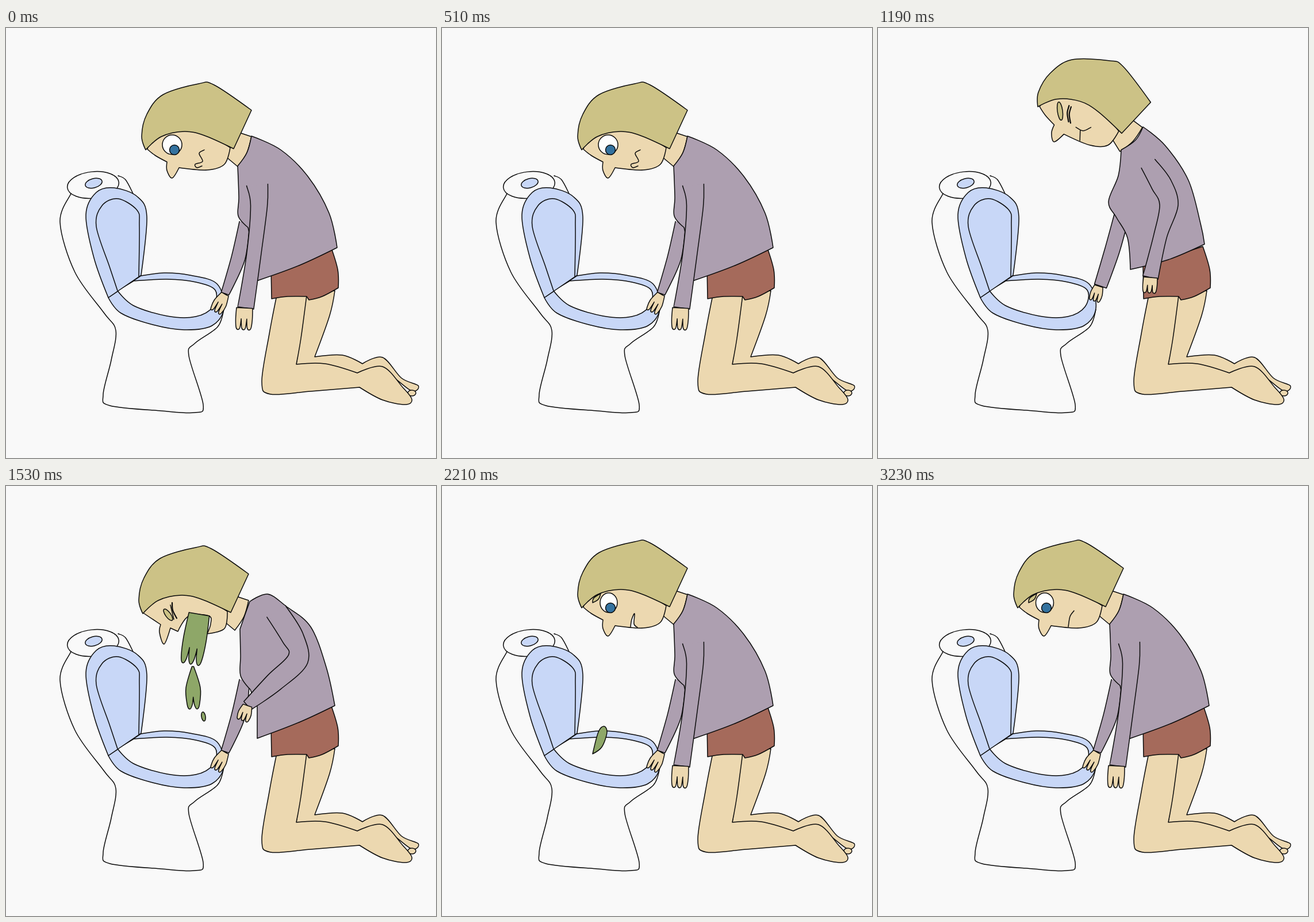
An HTML page for the animation above (3.4 s loop, 748 by 748 pixels).

```html
<!DOCTYPE html>
<html lang="en">
<head>
<meta charset="utf-8">
<title>Sick day</title>
<style>
html, body { margin: 0; width: 100%; height: 100%; overflow: hidden; background: #f9f9f9; }
svg { display: block; width: 100%; height: 100%; }
path, ellipse { stroke: #0b0b0b; stroke-width: 1.5; stroke-linejoin: round; stroke-linecap: round; }
</style>
</head>
<body>
<svg id="stage" viewBox="0 0 748 748"></svg>
<script>
const PAPER = '#f9f9f9', SKIN = '#ecd8b0', HAIR = '#ccc286', SHIRT = '#ad9fb0', SHORTS = '#a56a5b';
const SEAT = '#c8d7f7', WHITE = '#fefefe', GREEN = '#8ea768', IRIS = '#34729f';
const STEP = 170, COUNT = 20;

let seed = 0;

// Redrawn-by-hand wobble: a smooth field, so shared joints stay joined.
const wobble = (x, y) => seed ? [
  x + 0.9 * Math.sin(x * 0.031 + y * 0.043 + seed * 2.4),
  y + 0.8 * Math.sin(x * 0.047 - y * 0.029 + seed * 4.1)
] : [x, y];

// "x,y" words become points; "!" marks a sharp corner.
const parse = text => text.trim().split(/\s+/).map(word =>
  [...word.replace('!', '').split(',').map(Number), word.endsWith('!')]);

// Smooth curve through points [x, y, sharp].
function curve(points, closed) {
  const pts = points.map(([x, y, sharp]) => [...wobble(x, y), sharp]);
  const n = pts.length;
  const at = i => closed ? pts[(i + n) % n] : pts[Math.max(0, Math.min(n - 1, i))];
  const handle = (i, side) => [0, 1].map(k =>
    (at(i)[k] + (at(i)[2] ? 0 : side * (at(i + 1)[k] - at(i - 1)[k]) / 6)).toFixed(1));
  let d = `M${pts[0][0]} ${pts[0][1]}`;
  for (let i = 0; i < (closed ? n : n - 1); i++) {
    d += `C${handle(i, 1)} ${handle(i + 1, -1)} ${at(i + 1).slice(0, 2)}`;
  }
  return d + (closed ? 'Z' : '');
}

const path = (fill, points, closed, w = 1.5) =>
  `<path fill="${fill}" style="stroke-width:${w}" d="${curve(points, closed)}"/>`;
const shape = (fill, text) => path(fill, parse(text), true);
const line = (text, w) => path('none', parse(text), false, w);
const oval = (fill, x, y, rx, ry, turn = 0) => {
  const [cx, cy] = wobble(x, y);
  return `<ellipse fill="${fill}" rx="${rx}" ry="${ry}" transform="translate(${cx} ${cy}) rotate(${turn})"/>`;
};
const move = (x, y, art) => `<g transform="translate(${x} ${y})">${art}</g>`;
const rotate = (deg, x, y, art) => `<g transform="rotate(${deg} ${x} ${y})">${art}</g>`;

// Sleeve around a centre line of "x,y,width" words.
function sleeve(text) {
  const mid = text.split(' ').map(word => word.split(',').map(Number));
  const last = mid.length - 1;
  const edge = side => mid.map(([x, y, w], i) => {
    const a = mid[Math.max(0, i - 1)], b = mid[Math.min(last, i + 1)];
    const dx = b[0] - a[0], dy = b[1] - a[1], k = side * w / 2 / Math.hypot(dx, dy);
    return [x - dy * k, y + dx * k, i === last];
  });
  return path(SHIRT, [...edge(1), ...edge(-1).reverse()], false);
}

// Palm or splash: starts w0 wide at (x, y) and splits into n prongs, w1 wide, ending at (tx, ty).
function prongs(fill, x, y, tx, ty, w0, w1, n = 3, split = 0.5) {
  const len = Math.hypot(tx - x, ty - y), ux = (tx - x) / len, uy = (ty - y) / len;
  const at = (u, v, sharp) => [x + ux * len * u - uy * v, y + uy * len * u + ux * v, sharp];
  const pitch = w1 / n, points = [at(0, -w0 / 2, true), at(0.5, -w1 / 2)];
  for (let k = 0; k < n; k++) {
    const c = (k + 0.5) * pitch - w1 / 2;
    points.push(at(0.9, c - pitch * 0.35), at(1, c), at(0.9, c + pitch * 0.35));
    if (k < n - 1) points.push(at(split, c + pitch / 2, true));
  }
  return path(fill, [...points, at(0.5, w1 / 2), at(0, w0 / 2, true)], true);
}
const hand = (...size) => prongs(SKIN, ...size);

const toilet = () =>
  path(PAPER, parse(`113,288 94,338 120,425 170,495 191,526 183,578 169,638 181,657 270,666 328,669
    343,655 318,570 328,549 368,520 379,490`), false) +
  line('195,257 208,264 222,290') +
  oval(PAPER, 151.5, 273, 45, 23, -6) +
  oval(SEAT, 152.5, 270, 15, 8, -15) +
  shape(SEAT, `178,469! 200,496 255,516 310,525 358,518 379,488 367,445 320,430 275,426 235,431!`) +
  shape(PAPER, '194,457! 222,483 280,501 330,502 360,485 364,456 330,442 280,437 222,440!') +
  shape(SEAT, '178,469! 153,400 139,325 157,286 188,278 228,293 245,328 235,430!') +
  line('194,457 180,415 157,345 167,309 195,297 228,317 232,345 231,432');

const legs = () =>
  shape(SKIN, `522,460! 572,457! 563,500 537,572! 585,569 620,584! 655,573 688,609 717,622 705,631
    660,600 611,600! 505,585!`) +
  oval(SKIN, 706, 635, 7, 5) +
  shape(SKIN, `471,465! 458,532 445,615 460,637 530,632 615,625! 655,647 695,655 706,646 690,625
    655,589 611,600! 555,584 505,585! 513,540 523,465!`);

const shorts = () => shape(SHORTS, '461,414! 462,471! 490,467 523,467! 527,473! 550,467 578,452! 577,420 565,380!');

const grip = () => sleeve('415,338,18 404,400,24 381,462,14') + hand(381, 463, 364, 494, 14, 23);

const farArm = {
  down: grip,
  heave: grip,
  up: () => sleeve('424,326,26 407,388,26 387,449,22') + hand(384, 449, 376, 475, 15, 21)
};

const torso = {
  down: () => shape(SHIRT, `427,188! 478,212 525,258 562,322 576,382! 510,413 436,440! 430,390 421,347!
    404,327 405,295 403,240! 419,217`),
  up: () => shape(SHIRT, `461,172! 500,205 540,265 561,340 568,376! 505,403 439,420! 434,365 415,330
    401,302 418,257 423,212! 448,195`),
  heave: () => shape(SHIRT, `424,201! 455,188 487,209 530,245 557,315 572,382! 510,411 437,439! 437,384!
    425,354! 408,330 408,295 407,249! 415,226`)
};

const nearArm = {
  down: () => sleeve('437,273,37 440,310,29 431,395,25 417,487,28') + hand(415, 487, 413, 525, 28, 29),
  up: () => sleeve('470,236,28 493,272,36 506,308,32 491,362,23 474,434,27') + hand(474, 434, 472, 461, 24, 25),
  heave: () => sleeve('470,218,38 499,264,38 508,301,36 467,341,33 420,382,19') + hand(420, 382, 411, 408, 16, 23)
};

// One head serves every pose: it is drawn looking down, then shifted or tipped back.
const place = {
  down: art => art,
  heave: art => move(-5, 10, art),
  up: art => move(35, -75, rotate(18.3, 243, 212, art))
};

const neck = () => shape(SKIN, '400,180! 427,189! 419,217 403,241! 385,226! 385,195!');
const bob = () => shape(HAIR, `243,212! 236,188 245,150 273,116 335,97 362,99 427,143! 396,210!
  345,187 310,180 270,189`);
const skull = front => shape(SKIN, `${front} 390,208! 300,150! 250,190!`);
const face = () => skull('246,211! 260,222 280,233! 280,248 289,261 301,243! 350,247 380,237');
const gape = () => skull(`244,211! 274,231! 272,245 280,265 291,237! 304,243! 323,216 358,216 361,230
  355,247! 385,238`);
const eye = (x, rx) => oval(WHITE, x, 203, rx, 17) + oval(IRIS, 293, 212, 8.5, 8.5);
const brow = () => shape(HAIR, '262,203! 264,195 276,187! 272,197');
const squint = (x, y, ry, turn) => oval(HAIR, x, y, 4.5, ry, turn);
const lash = () => line('294,193 295,206 302,220', 2.2);

const head = {
  queasy: () => face() + bob() + eye(289, 17) +
    line('345,212 336,218 342,232 329,237 332,243 341,240'),
  relief: () => face() + bob() + brow() + eye(290, 15) +
    path(PAPER, parse('328,245 330,232 335,222 334,240 340,246'), false),
  smile: () => face() + bob() + brow() + eye(290, 15.5) + line('341,217 334,227 331,245'),
  bulge: () => face() + bob() + squint(282, 207, 16, -26) + lash() + move(4, 1, lash()) +
    line('317,225 331,227 342,217') + line('326,228 331,245'),
  heave: () => gape() + bob() + squint(287, 214, 12, -36) + lash() + line('291,197 297,222')
};

const gush = () => prongs(GREEN, 336, 223, 321, 310, 36, 40, 3, 0.68);
const spurt = () => prongs(GREEN, 336, 223, 329, 276, 36, 30, 2, 0.8);
const glob = () => prongs(GREEN, 325, 314, 326, 388, 3, 25, 2, 0.72);
const bead = () => oval(GREEN, 343.5, 401, 3.5, 8, -10);
const leaf = () => shape(GREEN, '282,418 287,429 278,454 262,466! 272,428');

const lean = (deg, art) => rotate(deg, 520, 425, art);

function figure(pose, mood, { tilt = 0, spill = '' } = {}) {
  const upper = place[pose](neck()) + torso[pose]() + nearArm[pose]() + place[pose](head[mood]());
  return toilet() + legs() + shorts() + farArm[pose]() + lean(tilt, upper) + spill;
}

function scene(i) {
  if (i < 7) return figure('down', 'queasy');
  if (i === 7) return figure('up', 'bulge');
  if (i === 8) return figure('heave', 'heave', { tilt: 6.5, spill: lean(6.5, spurt()) });
  if (i === 9) return figure('heave', 'heave', { spill: gush() + glob() + bead() });
  if (i === 10) return figure('heave', 'heave', {
    tilt: 3.4, spill: lean(3.4, spurt()) + move(-6, 25, glob()) + move(-22, 62, bead())
  });
  if (i > 13) return figure('down', 'smile');
  const fall = 13 - i;
  return figure('down', 'relief', { spill: move(14 * fall, -60 * fall, leaf()) });
}

const stage = document.getElementById('stage');
const drawings = Array.from({ length: COUNT }, (_, i) => {
  seed = i < 7 || i === 9 ? i % 3 : (i + 2) % 3;
  return scene(i);
});

let shown = -1;
function render(now) {
  const i = Math.floor(now / STEP) % COUNT;
  if (i !== shown) stage.innerHTML = drawings[shown = i];
}

const start = performance.now();
function tick() {
  render(performance.now() - start);
  requestAnimationFrame(tick);
}
tick();
</script>
</body>
</html>
```
